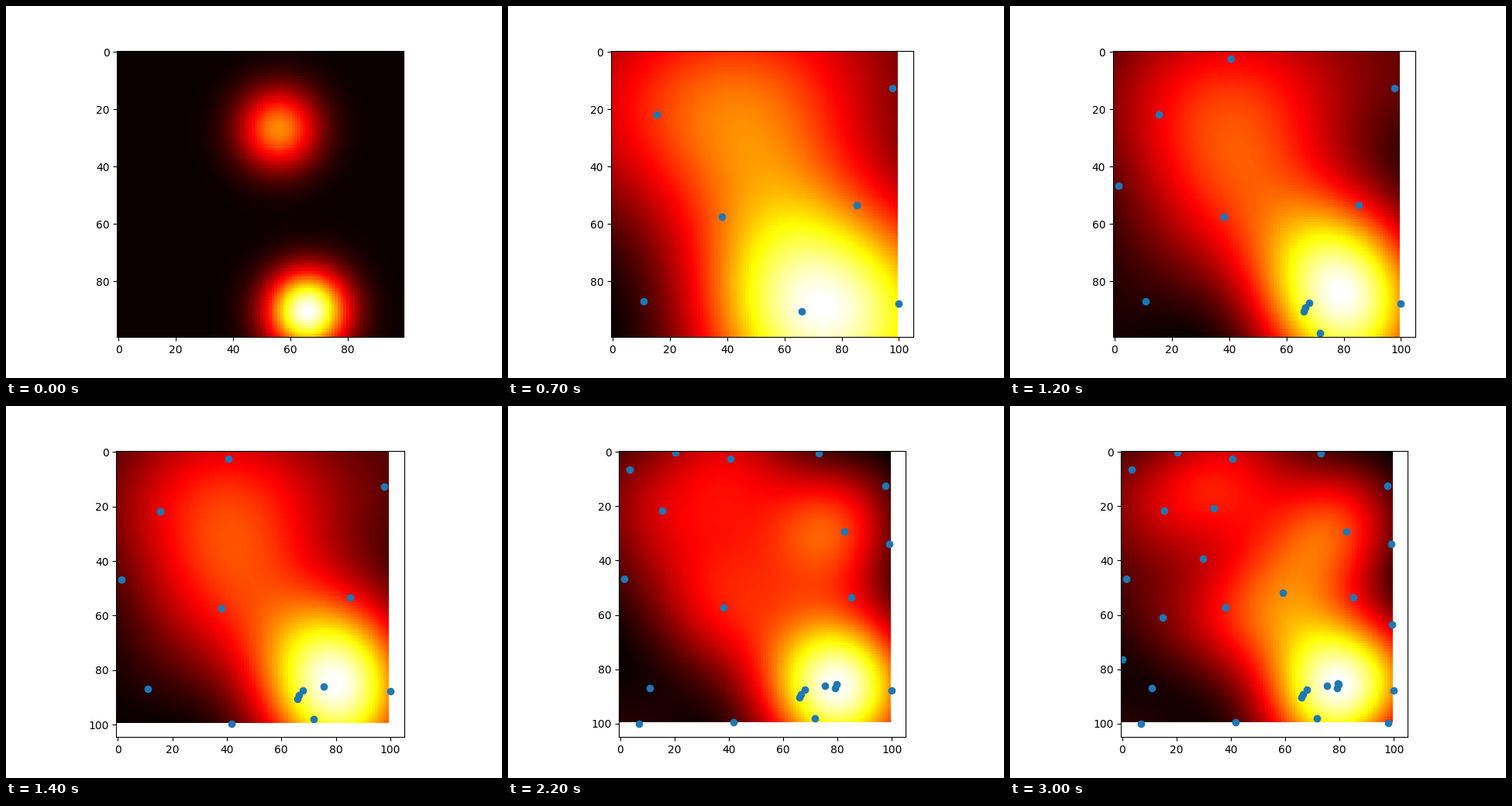
A matplotlib script for the animation above (3.1 s loop, 640 by 480 pixels).

```python
import numpy as np
import matplotlib.pyplot as plt
from matplotlib.animation import FuncAnimation

SIZE = 100
FRAMES = 31
INTERVAL = 100
NOISE = 0.004

# Places in the order they are tried, with the score found there: x, y, score.
# The first one is known from the start and never marked.
TRIALS = np.array([
    (56, 27, 0.44), (66, 90.5, 0.77), (85.2, 53.5, 0.40),
    (15.5, 21.7, 0.34), (11, 87, 0.05), (97.7, 12.6, 0.14),
    (38.1, 57.4, 0.42), (100, 87.7, 0.58), (66.6, 89.2, 0.80),
    (40.6, 2.4, 0.35), (68, 87.5, 0.84), (1.4, 46.7, 0.14),
    (71.8, 98, 0.77), (75.5, 86, 0.98), (41.7, 99.6, 0.12),
    (79.2, 87, 1.00), (73.2, 0.4, 0.14), (79.6, 85.5, 1.00),
    (20.3, 0.1, 0.26), (3.5, 6.5, 0.20), (99.2, 34, 0.17),
    (82.4, 29.3, 0.48), (6.9, 100, 0.07), (99.3, 63.5, 0.31),
    (33.7, 20.8, 0.41), (29.8, 39.4, 0.30), (59, 52, 0.59),
    (14.8, 61, 0.19), (0, 76.3, 0.05), (97.9, 99.7, 0.45),
    (79.3, 85.3, 1.00),
])

cells = np.arange(SIZE)


def kernel(a, b, length):
    return np.exp(-0.5 * (np.subtract.outer(a, b) / length) ** 2)


def length_scale(step):
    """Narrow at first, then wide and settling as trials fill the square."""
    if step < 7:
        return 10 + 0.3 * step
    return max(20, 32 - 1.2 * (step - 7))


def estimate(step):
    """Gaussian process mean over the square, one trial ahead of the marks."""
    x, y, score = TRIALS[:step + 2].T
    length = length_scale(step)
    cov = kernel(x, x, length) * kernel(y, y, length)
    weights = np.linalg.solve(cov + NOISE * np.eye(len(x)), score)
    return (kernel(cells, y, length) * weights) @ kernel(x, cells, length)


fig, ax = plt.subplots(figsize=(6.4, 4.8), dpi=100)


def draw(step):
    ax.clear()
    ax.imshow(estimate(step), cmap="hot")
    if step:
        x, y, _ = TRIALS[1:step + 1].T
        ax.scatter(x, y, color="C0")
    return []


anim = FuncAnimation(fig, draw, frames=FRAMES, interval=INTERVAL,
                     repeat=True, repeat_delay=0)
plt.show()
```
